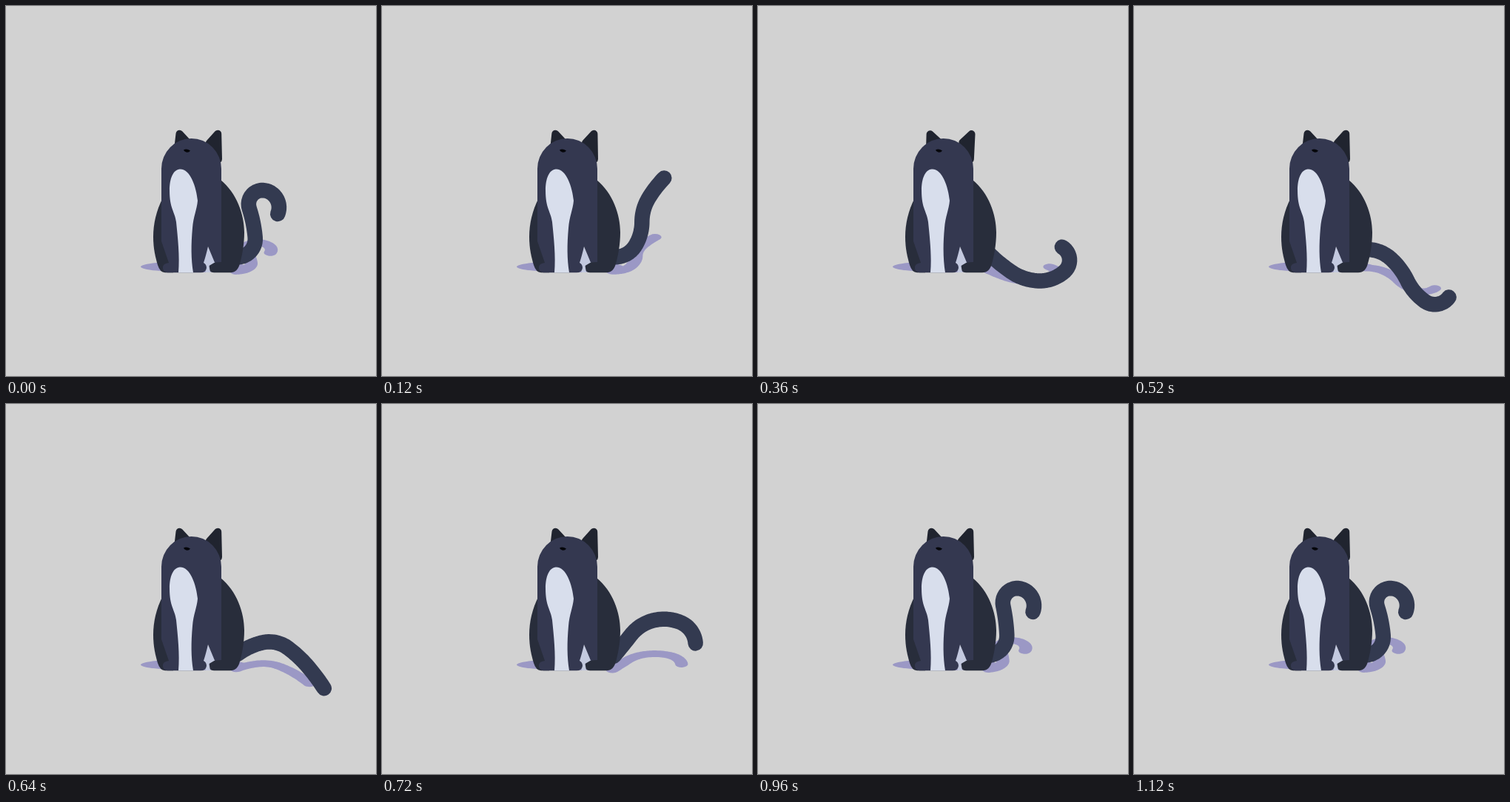
An HTML page for the animation above (1.32 s loop, 500 by 500 pixels).

```html
<!DOCTYPE html>
<html lang="en">
<head>
<meta charset="utf-8">
<title>Cat swinging its tail</title>
<style>
  html, body { margin: 0; width: 100%; height: 100%; overflow: hidden; background: #d2d2d2; }
  svg { display: block; width: 100%; height: 100%; }
  .shadow { fill: #9b98c5; stroke: #9b98c5; }
  .haunch { fill: #282d3b; }
  .front { fill: #343850; }
  .ear { fill: #20242f; stroke: #20242f; stroke-width: 10; stroke-linejoin: round; }
</style>
</head>
<body>
<svg viewBox="0 0 500 500">
  <defs>
    <path id="tail" fill="none" stroke-width="20.500" stroke-linecap="round" stroke-linejoin="round"/>
  </defs>

  <ellipse class="shadow" stroke-width="0" cx="254" cy="352.3" rx="72" ry="7.500"/>
  <use href="#tail" class="shadow" transform="matrix(.845 0 0 .43 46.8 212.5)"/>
  <use href="#tail" stroke="#333a50"/>

  <path id="earL" class="ear" d="M234.500 172.700 L232.500 190 L244 183 Z"/>
  <path id="earR" class="ear" d="M286.200 172.700 L275 185 L287 207 Z"/>

  <!-- back of the body -->
  <path class="haunch" d="M212 259 C203 277 199 294 199 312 C199 328 202 340 205 350 Q208 360 215 360.300 L226 360.300 L226 259 Z"/>
  <path class="haunch" d="M290 235 C312 253 322 282 322 306 C322 322 319 338 316 348 Q313 360.300 303 360.300 L281 360.300 Q274 360 274 353 Q275 346 283 346 L288 346 Z"/>
  <path fill="#c3c9df" d="M272 324 L266 348 L270 360 L276 360 L274.500 351 L283 346 Z"/>

  <!-- head, chest and front legs -->
  <path class="front" d="M210 220 A40.500 41 0 0 1 291 220 L291 346 L282 346.500 L273 325 Q270 338 267 347 Q271 349 271 354 Q270 360.300 263 360.300 L218 360.300 Q211 359 212 352 Q213 348 220 347 L210 318 Z"/>
  <path fill="#d8deec" d="M235 220.500 C249 220 257 244 259 263 C258 275 253 285 252 300 C250 322 250 342 253 360.300 L233 360.300 C235 338 232 312 230 292 C228 277 221 274 221 249 C221 233 226 221 235 220.500 Z"/>
  <path fill="#05060a" d="M240 194.500 Q244 192.300 249 195.500 Q247 198.500 243.500 197.500 Q240.500 196.500 240 194.500 Z"/>
</svg>
<script>
const LOOP = 1320, STEP = 40, ROOT_X = 313, PARTS = 48;

// A pose: height of the root, length, then the heading in degrees at five
// evenly spaced joints. Between joints the tail bends in a circular arc.
const curled = [339.5, 160, -2, -95, -108, 14, 112];
const keys = [
  { t: 0, pose: curled },
  { t: 200, pose: [338.5, 124, 12, -22, -68, -98, -138] },
  { t: 360, pose: [335.5, 154, 44, 34, 2, -42, -150] },
  { t: 520, pose: [329, 148, -2, 42, 64, 36, -54] },
  { t: 580, pose: [334, 147, -20, 20, 62, 66, 20] },
  { t: 720, pose: [341, 148, -50, -52, -14, 22, 86] },
  { t: 1020, pose: curled }
];

const slope = (k, c) => keys[k] && keys[k + 1]
  ? (keys[k + 1].pose[c] - keys[k].pose[c]) / (keys[k + 1].t - keys[k].t) : 0;

// Monotone tangent: never overshoots a key pose.
function tangent(k, c) {
  const a = slope(k - 1, c), b = slope(k, c);
  return a * b > 0 ? 2 * a * b / (a + b) : 0;
}

function poseAt(t) {
  let k = 0;
  while (k < keys.length - 2 && t >= keys[k + 1].t) k++;
  const a = keys[k], b = keys[k + 1], span = b.t - a.t;
  const u = Math.min(1, (t - a.t) / span), w = u * u * (3 - 2 * u);
  return a.pose.map((v, c) => v + (b.pose[c] - v) * w
    + span * u * (1 - u) * ((1 - u) * tangent(k, c) - u * tangent(k + 1, c)));
}

function tailPath([y, length, ...headings]) {
  let x = ROOT_X, d = `M${x} ${y}`;
  for (let i = 0; i < PARTS; i++) {
    const s = (i + .5) / PARTS * (headings.length - 1), j = Math.floor(s);
    const angle = (headings[j] + (headings[j + 1] - headings[j]) * (s - j)) * Math.PI / 180;
    x += Math.cos(angle) * length / PARTS;
    y += Math.sin(angle) * length / PARTS;
    d += `L${x.toFixed(2)} ${y.toFixed(2)}`;
  }
  return d;
}

const get = id => document.getElementById(id);
const tail = get("tail"), earL = get("earL"), earR = get("earR");

function draw() {
  const t = Math.floor(performance.now() % LOOP / STEP) * STEP;
  const twitch = t > 80 && t < 520 ? Math.sin(Math.PI * (t - 80) / 440) ** 2 : 0;
  tail.setAttribute("d", tailPath(poseAt(t)));
  earL.setAttribute("transform", `rotate(${-6 * twitch} 240 195)`);
  earR.setAttribute("transform", `rotate(${5 * twitch} 283 205)`);
  requestAnimationFrame(draw);
}
draw();
</script>
</body>
</html>
```
